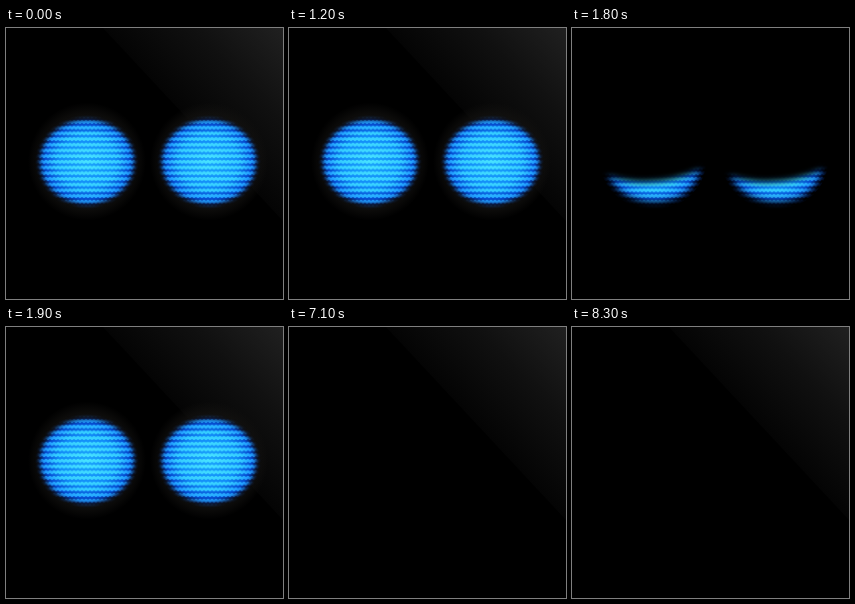
Recreate the animation shown at these times as an HTML page. Size 277x271 px, loop 8.4 s.

```html
<!DOCTYPE html>
<html lang="en">
<head>
<meta charset="utf-8">
<title>Blinking eyes</title>
<style>
  html, body { margin: 0; width: 100%; height: 100%; overflow: hidden; background: #000; }
  svg { display: block; width: 100%; height: 100%; }
  .pose, .shine { animation: 8400ms step-end infinite; }
  .pose { visibility: hidden; }
  .open { animation-name: open; }
  .half { animation-name: half; }
  .low { animation-name: low; }
  .sliver { animation-name: sliver; }
  .rise { animation-name: rise; }
  .smile { animation-name: smile; }
  .shine { animation-name: shine; }

  @keyframes open {
    0%, 14.285%, 22.619% { visibility: visible; }
    11.904%, 20.238%, 82.142%, 100% { visibility: hidden; }
  }
  @keyframes half {
    0%, 13.095%, 21.428%, 100% { visibility: hidden; }
    11.904%, 20.238% { visibility: visible; }
  }
  @keyframes low {
    0%, 14.285%, 22.619%, 83.333%, 100% { visibility: hidden; }
    13.095%, 21.428%, 82.142% { visibility: visible; }
  }
  @keyframes sliver {
    0%, 84.523%, 100% { visibility: hidden; }
    83.333% { visibility: visible; }
  }
  @keyframes rise {
    0%, 86.904%, 100% { visibility: hidden; }
    85.714% { visibility: visible; }
  }
  @keyframes smile {
    0%, 98.809%, 100% { visibility: hidden; }
    86.904% { visibility: visible; }
  }
  @keyframes shine {
    0%, 22.619%, 84.523%, 100% { visibility: visible; }
    21.428%, 82.142% { visibility: hidden; }
  }
</style>
</head>
<body>
<svg viewBox="0 0 277 271" preserveAspectRatio="none">
  <defs>
    <linearGradient id="sheen" gradientUnits="userSpaceOnUse" x1="181" y1="90" x2="277" y2="0">
      <stop offset="0" stop-color="#040404"/>
      <stop offset=".5" stop-color="#101010"/>
      <stop offset="1" stop-color="#202020"/>
    </linearGradient>
    <radialGradient id="halo">
      <stop offset=".7" stop-color="#141311"/>
      <stop offset="1" stop-color="#141311" stop-opacity="0"/>
    </radialGradient>
    <radialGradient id="base">
      <stop offset="0" stop-color="#1ca6fc"/>
      <stop offset=".55" stop-color="#128af8"/>
      <stop offset=".82" stop-color="#064ad0"/>
      <stop offset="1" stop-color="#000c40"/>
    </radialGradient>
    <radialGradient id="glow">
      <stop offset="0" stop-color="#48e2ff"/>
      <stop offset=".6" stop-color="#34ccff"/>
      <stop offset=".86" stop-color="#1c90ff"/>
      <stop offset="1" stop-color="#0a48e0"/>
    </radialGradient>
    <pattern id="waves" patternUnits="userSpaceOnUse" y="125.3" width="4" height="5.7">
      <path d="M-2 3.4L0 2.2L2 3.4L4 2.2L6 3.4" fill="none" stroke="#fff" stroke-width="2.7"/>
    </pattern>
    <mask id="rows" maskUnits="userSpaceOnUse" x="0" y="70" width="160" height="130">
      <rect y="70" width="160" height="130" fill="url(#waves)"/>
    </mask>
    <filter id="soft" filterUnits="userSpaceOnUse" x="0" y="60" width="277" height="150">
      <feGaussianBlur stdDeviation="2"/>
    </filter>
    <filter id="haze" filterUnits="userSpaceOnUse" x="0" y="60" width="277" height="150">
      <feGaussianBlur stdDeviation="3"/>
    </filter>

    <g id="eye">
      <ellipse cx="81" cy="133.5" rx="51" ry="46" fill="url(#base)"/>
      <ellipse cx="81" cy="133.5" rx="53" ry="48" fill="url(#glow)" mask="url(#rows)"/>
    </g>
    <g id="eyes"><use href="#eye"/><use href="#eye" x="122"/></g>

    <ellipse id="openLid" cx="81" cy="134" rx="47.5" ry="42.5"/>
    <path id="halfLid" d="M34 129Q81 128 128.500 129C126 155 106 174 81 174C56 174 36 155 34 129Z"/>
    <path id="lowLid" d="M35 148Q82 163 130 141C122 166 104 174 83 174C60 174 44 164 35 148Z"/>
    <path id="sliverLid" d="M44 160Q82 172 122 156C113 169 99 174 83 174C67 174 53 169 44 160Z"/>
    <path id="riseLid" d="M46 128C56 117 68 113 82 113C98 113 110 119 120 131Q84 112 46 128Z"/>
    <path id="smileLid" d="M35 141C46 120 62 113.500 81 113.500C104 113.500 120 126 129 146.500Q84 120 35 141Z"/>

    <g fill="#fff">
      <mask id="openMask" maskUnits="userSpaceOnUse" x="0" y="0" width="277" height="271">
        <g filter="url(#soft)"><use href="#openLid"/><use href="#openLid" x="122"/></g>
      </mask>
      <mask id="halfMask" maskUnits="userSpaceOnUse" x="0" y="0" width="277" height="271">
        <g filter="url(#haze)"><use href="#halfLid"/><use href="#halfLid" x="122"/></g>
      </mask>
      <mask id="lowMask" maskUnits="userSpaceOnUse" x="0" y="0" width="277" height="271">
        <g filter="url(#haze)"><use href="#lowLid"/><use href="#lowLid" x="122"/></g>
      </mask>
      <mask id="sliverMask" maskUnits="userSpaceOnUse" x="0" y="0" width="277" height="271">
        <g filter="url(#haze)"><use href="#sliverLid"/><use href="#sliverLid" x="122"/></g>
      </mask>
      <mask id="riseMask" maskUnits="userSpaceOnUse" x="0" y="0" width="277" height="271">
        <g filter="url(#haze)"><use href="#riseLid"/><use href="#riseLid" x="122"/></g>
      </mask>
      <mask id="smileMask" maskUnits="userSpaceOnUse" x="0" y="0" width="277" height="271">
        <g filter="url(#haze)"><use href="#smileLid"/><use href="#smileLid" x="122"/></g>
      </mask>
    </g>
  </defs>

  <rect width="277" height="271"/>
  <path class="shine" d="M97 0H277V193Z" fill="url(#sheen)"/>
  <g class="pose open">
    <circle cx="81" cy="133.5" r="59" fill="url(#halo)"/>
    <circle cx="203" cy="133.5" r="59" fill="url(#halo)"/>
    <use href="#eyes" mask="url(#openMask)"/>
  </g>
  <use class="pose half" href="#eyes" mask="url(#halfMask)"/>
  <use class="pose low" href="#eyes" mask="url(#lowMask)"/>
  <use class="pose sliver" href="#eyes" mask="url(#sliverMask)"/>
  <use class="pose rise" href="#eyes" mask="url(#riseMask)"/>
  <use class="pose smile" href="#eyes" mask="url(#smileMask)"/>
</svg>
</body>
</html>
```
